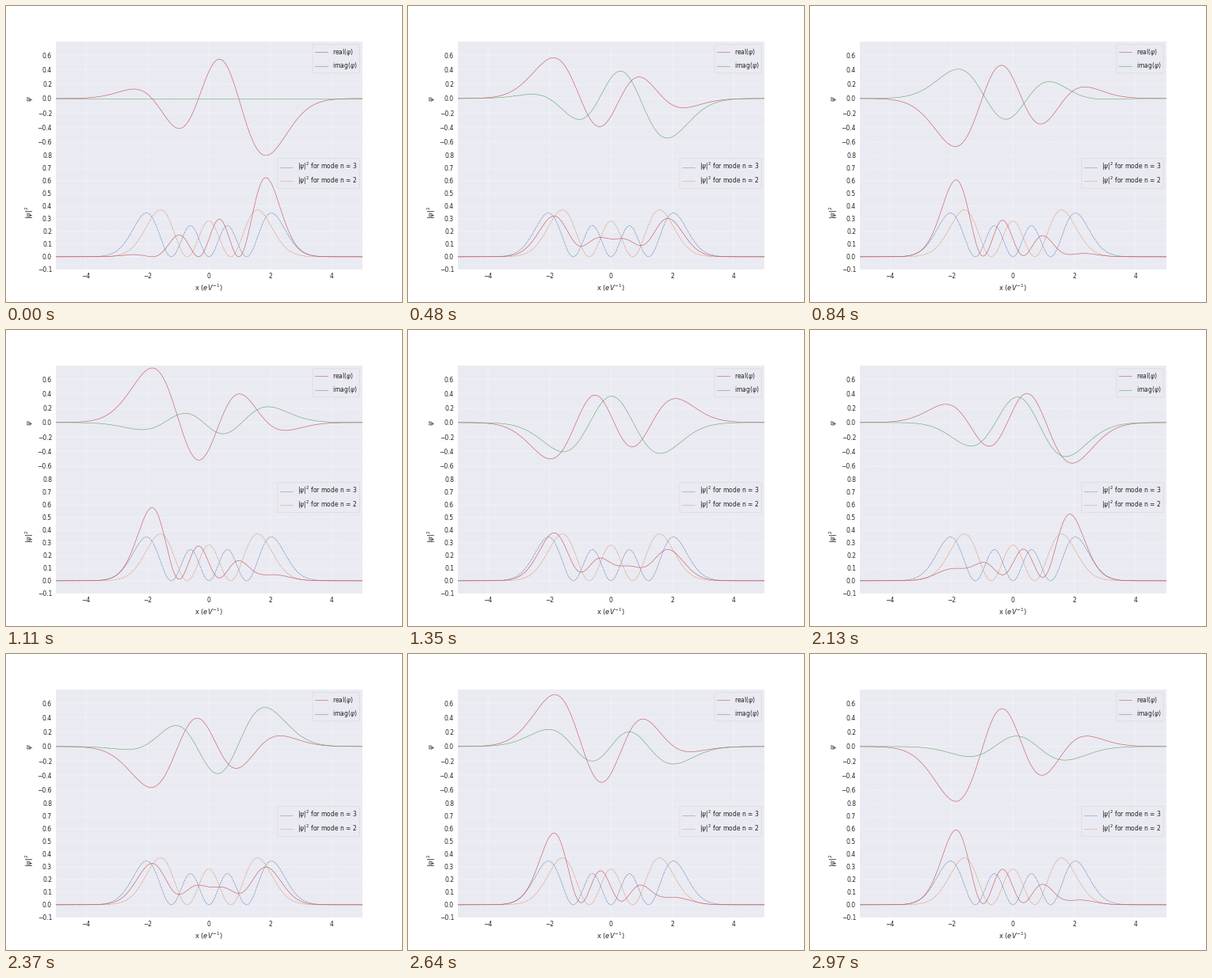
A matplotlib script that plays this animation: 500 by 374 pixels, repeating every 3 s.

```python
import math

import numpy as np
import matplotlib.pyplot as plt
from matplotlib.animation import FuncAnimation
from matplotlib.lines import Line2D
from matplotlib.patches import FancyBboxPatch
from matplotlib.transforms import Affine2D

W, H, DPI = 500, 374, 50
FRAMES, INTERVAL = 100, 30
DT = 0.1
RED, GREEN, BLUE, ORANGE = "#C44E52", "#55A868", "#4C72B0", "#DD8452"
PANEL, INK = "#EAEAF2", "0.15"
LW = 0.8

plt.rcParams.update({
    "font.family": "DejaVu Sans",
    "text.color": INK,
    "axes.labelcolor": INK,
    "axes.labelsize": 12,
    "axes.labelpad": 4.5,
    "xtick.labelsize": 11,
    "ytick.labelsize": 11,
})


def mode(n, x):
    """Harmonic oscillator eigenfunction, with m = omega = hbar = 1."""
    hermite = np.polynomial.hermite.hermval(x, [0] * n + [1])
    norm = math.sqrt(2**n * math.factorial(n) * math.sqrt(math.pi))
    return hermite * np.exp(-x**2 / 2) / norm


x = np.linspace(-5, 5, 600)
phi2, phi3 = mode(2, x), mode(3, x)


def psi(t):
    mix = phi2 * np.exp(-2.5j * t) + phi3 * np.exp(-3.5j * t)
    return -mix / math.sqrt(2)


fig, (top, low) = plt.subplots(2, 1, sharex=True, figsize=(W / DPI, H / DPI),
                               dpi=DPI, facecolor="white")
fig.subplots_adjust(left=0.125, right=0.9, bottom=0.11, top=0.88, hspace=0)
pixels = Affine2D().scale(1 / W, -1 / H).translate(0, 1) + fig.transFigure


def style(ax, ylim, ticks, ylabel):
    ax.set_facecolor(PANEL)
    ax.set(xlim=(-5, 5), ylim=ylim, yticks=ticks, ylabel=ylabel)
    ax.spines[:].set_visible(False)
    ax.set_axisbelow(True)
    ax.grid(color="white", lw=0.7, ls="--")
    ax.tick_params(length=0, pad=6.3, labelcolor=INK)
    ax.yaxis.set_major_formatter("{x:.1f}")


def legend(left, y, bottom, rows, ls="-"):
    """Two-row legend box, in pixels from the top left of the figure."""
    fig.add_artist(FancyBboxPatch(
        (left, y), 446.2 - left, bottom - y, transform=pixels,
        boxstyle="round,pad=0,rounding_size=1.5",
        fc=PANEL, ec="0.8", lw=0.7, alpha=0.8))
    for i, (label, color) in enumerate(rows):
        row = bottom - 26.6 + 17.4 * i
        fig.add_artist(Line2D([left + 3.2, left + 18.8], [row, row], color=color,
                              lw=LW, ls=ls, transform=pixels))
        fig.text(left + 25.2, row + 2.7, label, fontsize=11,
                 va="baseline", transform=pixels)


style(top, (-0.79, 0.79), np.arange(-3, 4) * 0.2, r"$\psi$")
style(low, (-0.1, 0.8), np.arange(-1, 9) * 0.1, r"$|\psi|^2$")
top.tick_params(labelbottom=False)
low.set_xticks([-4, -2, 0, 2, 4])
low.set_xlabel(r"x ($eV^{-1}$)")

low.plot(x, phi3**2, "--", color=BLUE, lw=LW)
low.plot(x, phi2**2, "--", color=ORANGE, lw=LW)
real, = top.plot([], [], color=RED, lw=LW)
imag, = top.plot([], [], color=GREEN, lw=LW)
prob, = low.plot([], [], color=RED, lw=LW)

legend(387, 48.8, 84.9, [(r"real($\psi$)", RED), (r"imag($\psi$)", GREEN)])
legend(343, 192.7, 230.4, [(r"$|\psi|^2$ for mode n = 3", BLUE),
                           (r"$|\psi|^2$ for mode n = 2", ORANGE)], "--")


def update(i):
    wave = psi(i * DT)
    real.set_data(x, wave.real)
    imag.set_data(x, wave.imag)
    prob.set_data(x, np.abs(wave)**2)
    return real, imag, prob


anim = FuncAnimation(fig, update, frames=FRAMES, interval=INTERVAL,
                     repeat=True, repeat_delay=0, blit=False)
plt.show()
```
